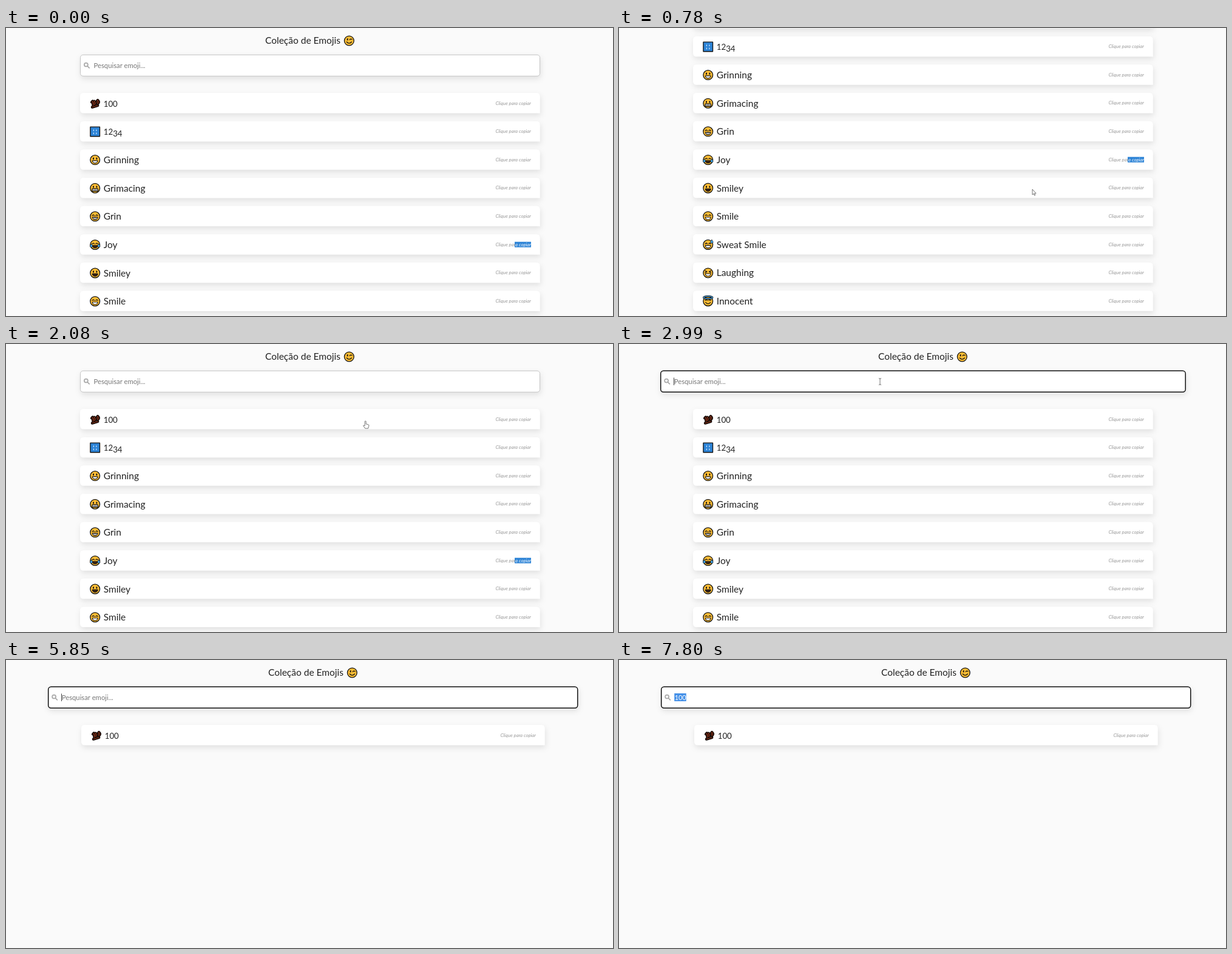
Animation of 1000x475 px, one loop 8000 ms. Source, as an HTML page:

```html
<!DOCTYPE html>
<html lang="pt">
<head>
<meta charset="utf-8">
<title>Coleção de Emojis</title>
<style>
html, body { margin: 0; width: 100%; height: 100%; overflow: hidden; background: #fafafa; }
svg { display: block; width: 100vw; height: 100vh; font: 15.5px Lato, "Open Sans", sans-serif; fill: #222; }
.card { fill: #fff; filter: drop-shadow(1px 4px 5px rgba(0,0,0,.1)); }
.hint { font-size: 7.8px; font-style: italic; fill: #999; text-anchor: end; }
.field { font-size: 11.3px; }
.icon { fill: none; stroke: #111; stroke-width: 1.3; stroke-linecap: round; stroke-linejoin: round; }
.pointer { fill: #fff; stroke: #555; stroke-width: .8; stroke-linejoin: round; }
</style>
</head>
<body>
<svg id="stage" viewBox="0 0 1000 475"></svg>
<script>
const LOOP = 8000, STEP = 130, PITCH = 46.63, ROW_H = 33.5;
const YELLOW = '#fbbc35', BLUE = '#2c83d6';

const path = (d, fill = 'none', extra = '') => `<path d="${d}" fill="${fill}" ${extra}/>`;
const disc = (r, fill, x = 0, y = 0, extra = '') => `<circle cx="${x}" cy="${y}" r="${r}" fill="${fill}" ${extra}/>`;
const face = (...parts) => disc(7.9, YELLOW) + parts.join('');

const dots = path('M-2.7-3v1.6M2.7-3v1.6', 'none', 'stroke-width="1.9"');
const arcs = path('M-4.6-1.3q1.7-2.6 3.4 0M1.2-1.3q1.7-2.6 3.4 0');
const grin = fill => path('M-4.4 1.3h8.8a4.4 4 0 0 1-8.8 0z', fill, 'stroke-width="1.1"');
const smile = path('M-4 2q4 4.4 8 0');
const teeth = path('M-2 1.4v3.4M0 1.4v3.8M2 1.4v3.4', 'none', 'stroke-width=".6"');
const drop = (x, y) => path(`M${x} ${y - 3}q-4.4 5.2 0 5.6q4.4-.4 0-5.6z`, '#41a8ee', 'stroke-width=".7"');
const hand = 'M-6.5 0l3-1 4-6q2.4.4 1.4 3.2l-.8 2.3h4.6q2 .5 1 2l-1.8 6.2q-.6 1-2 1h-9.4z';
const cloud = path('M-4 1.5q-2.5-1.2-.4-3q0-3.4 3.4-2.9q3.4-1 3.9 2q3.4 1 .8 3.9z', '#eee', 'stroke-width=".9"');
const clock = hands => disc(7.6, '#f4f4f4') + path(hands);

const numeral = 'M-5.5-2l1.6-1.6.8 7M-1-3.4q-2.4 3 .2 5.6q3-2.6-.2-5.6zM4.4-5.2q-2.6 3 .1 5.8q3.2-2.6-.1-5.8zM-4.6 6.2l9-2.6';
const icons = {
  '100': path(numeral, 'none', 'stroke="#160b07" stroke-width="4.6"') + path(numeral, 'none', 'stroke="#a03a1c" stroke-width="1"'),
  '1234': path('M-7.8-7.8h15.6v15.6h-15.6z', BLUE) +
    path('M-2.3-3v1.6M2.2-3v1.6M-2.3 2v1.6M2.2 2v1.6', 'none', 'stroke="#d8ecff" stroke-width="1.2"'),
  'Grinning': face(dots, grin('#fff')),
  'Grimacing': face(dots, path('M-4.6 1h9.2v3.8h-9.2z', '#fff'), teeth),
  'Grin': face(arcs, grin('#fff'), teeth),
  'Joy': face(arcs, grin('#3b2414'), drop(-6.2, 1.5), drop(6.2, 1.5)),
  'Smiley': face(dots, grin('#3b2414')),
  'Smile': face(arcs, grin('#fff')),
  'Sweat Smile': face(arcs, grin('#fff'), drop(6.2, -5)),
  'Laughing': face(path('M-4.8-3.6l3 1.7-3 1.5M4.8-3.6l-3 1.7 3 1.5'), grin('#fff')),
  'Innocent': face(arcs, smile, '<ellipse cy="-6.2" rx="7.2" ry="2" stroke="#111" stroke-width="3"/><ellipse cy="-6.2" rx="7.2" ry="2" stroke="#4da9ea"/>'),
  'Wink': face(path('M-2.7-3v1.6', 'none', 'stroke-width="1.9"'), path('M1-1.8q1.8-1.8 3.8-.4'), smile),
  'Blush': face(arcs, smile),
  'Slight Smile': face(dots, smile),
  'Hugging': face(arcs, smile, path('M-7.4 3.4q2.8-1.4 4 1.8l-1.2 2.4q-3.3 0-2.8-4.2zM7.4 3.4q-2.8-1.4-4 1.8l1.2 2.4q3.3 0 2.8-4.2z', YELLOW)),
  'Hushed': face(dots, path('M-4.8-5.4l2-.8M4.8-5.4l-2-.8'), disc(2, '#3b2414', 0, 3.4)),
  'Thinking': face(dots, path('M-2.5 2.2q2.8-1.5 5 0M-5 6.6l1-2.6 4 .8')),
  'Thumbsup': path(hand, YELLOW),
  'Thumbsdown': `<g transform="scale(1 -1)">${path(hand, YELLOW)}</g>`,
  'Camel': path('M-7-5.8l3-1 1.4 1.6-.6 3.8q1.3.5 1.7-1.8q1.7-4.4 3.6 0q3.8-.6 4.4 3v3l-1.4 1v4.4h-2v-4.4h-4.2v4.4h-2v-5q-3.2-1.4-2.6-6.6l-1.6-.4z', '#eaa23a'),
  'Sun With Face': disc(7.3, YELLOW, 0, 0, 'stroke-width="2.6" stroke-dasharray="2.5 2.2"') +
    disc(5.8, YELLOW, 0, 0, 'stroke-width=".8"') + path('M-2-1.6v.8M2-1.6v.8M-2.4 1.6q2.4 2.2 4.8 0', 'none', 'stroke-width="1"'),
  'Thunder Cloud Rain': cloud + path('M.8.2l-1.6 2.4h1.8l-1.2 2.2M-3 3l-.5 1.2M3.4 3l-.5 1.2', 'none', 'stroke-width=".8"'),
  'Clock10': clock('M0-4.6v4.6l-3.2-2'),
  'Clock1030': clock('M0 4.6v-4.6l-3.4-1.2'),
};
const narrow = { 'Thumbsup': -2.5, 'Thumbsdown': -2.5, 'Thunder Cloud Rain': -6 };

const ALL = ['100', '1234', 'Grinning', 'Grimacing', 'Grin', 'Joy', 'Smiley', 'Smile', 'Sweat Smile',
  'Laughing', 'Innocent', 'Wink', 'Blush', 'Slight Smile'];
const HU = ['100', 'Hugging', 'Hushed', 'Thumbsup', 'Thumbsdown', 'Camel', 'Sun With Face', 'Thunder Cloud Rain'];
const H = ['100', 'Laughing', 'Hugging', 'Thinking', 'Hushed', 'Thumbsup', 'Thumbsdown', 'Camel', 'Sun With Face'];

// [time, typed text, visible list, caret shown]
const script = [
  [0, '', ALL, 0], [2600, '', ALL, 1], [3120, '', ALL, 0],
  [3770, 'h', ALL, 1], [3900, 'h', H, 1], [4030, 'hu', H, 1], [4160, 'hun', HU, 1],
  [4290, 'hun', ['100', 'Sun With Face', 'Thunder Cloud Rain'], 1],
  [4420, 'hund', ['100', 'Sun With Face', 'Thunder Cloud Rain'], 1],
  [4550, 'hund', ['100', 'Thunder Cloud Rain'], 1],
  [4680, 'hundr', ['100'], 1], [4940, 'hundred', ['100'], 1], [5460, 'hundred', ['100'], 0],
  [5590, 'hundre', ['100'], 1], [5720, 'hun', ['100'], 1], [5850, '', ['100'], 1],
  [6110, '', ALL, 1], [6240, '1', ALL, 1], [6370, '1', ['100', '1234', 'Clock10', 'Clock1030'], 1],
  [6500, '10', ['100', '1234', 'Clock10', 'Clock1030'], 1], [6630, '10', ['100', 'Clock10', 'Clock1030'], 1],
  [6890, '100', ['100', 'Clock10', 'Clock1030'], 1], [7020, '100', ['100'], 1],
  [7540, '100', ['100'], 0], [7800, '100', ['100'], 0],
];

const scrollKeys = [[130, 0], [780, 140], [1040, 159], [1170, 159], [1300, 87], [1560, 0]];
const mouseX = [[1560, 682], [2080, 593], [2340, 430]];
const mouseY = [[1560, 271], [2080, 133], [2340, 62]];

function track(keys, t) {
  const i = keys.findIndex(k => k[0] > t);
  if (i < 0) return keys.at(-1)[1];
  if (i === 0) return keys[0][1];
  const [t0, a] = keys[i - 1], [t1, b] = keys[i];
  return a + (b - a) * (t - t0) / (t1 - t0);
}

const icon = (name, x, y) => `<g class="icon" transform="translate(${x} ${y})">${icons[name]}</g>`;

function label(name) {
  if (!/^\d+$/.test(name)) return name;
  return `<tspan font-size="13.3">${name.replace('34', '<tspan dy="3">34</tspan>')}</tspan>`;
}

function row(name, i, x, w, selected) {
  const y = 107 + i * PITCH, end = x + w - 14.7;
  const hint = selected
    ? `<rect x="${end - 27}" y="${y + 12.5}" width="27" height="9" fill="${BLUE}"/>
       <text class="hint" x="${end}" y="${y + 19.6}">Clique par<tspan fill="#fff">a copiar</tspan></text>`
    : `<text class="hint" x="${end}" y="${y + 19.6}">Clique para copiar</text>`;
  return `<path class="card" d="M${x + 6} ${y}h${w - 12}q6 0 6 6v${ROW_H - 6}h${6 - w}q-6 0-6-6v${12 - ROW_H}q0-6 6-6z"/>`
    + icon(name, x + 24.7 + (narrow[name] || 0) / 3, y + 17.3)
    + `<text x="${x + 38.7 + (narrow[name] || 0)}" y="${y + 22.8}">${label(name)}</text>` + hint;
}

function search(t, text, caret, wide) {
  const grow = 1 - (1 - Math.min(1, Math.max(0, (t - 2520) / 470))) ** 2;
  const focused = t >= 2600, selected = t >= 7800;
  const x = wide ? 69.7 : 122.5 - 53.8 * grow;
  const w = wide ? 872 : 757 + 107.5 * grow;
  const tx = x + 22;
  const size = /\d/.test(text) ? 10.9 : 11.3;
  const caretX = tx + (text ? measure(text, size) + .6 : -.2);
  return `<rect class="card" x="${x}" y="44.3" width="${w}" height="35" rx="4.5"
      stroke="${focused ? '#111' : '#c4c4c4'}" stroke-width="${focused ? 1.5 : 1}"/>
    <g fill="none" stroke="#a9a9a9" stroke-width="1.7"><circle cx="${x + 9.4}" cy="60.6" r="3"/><path d="M${x + 11.6} 62.8l3.6 3.6"/></g>`
    + (selected ? `<rect x="${tx - .5}" y="55" width="19.5" height="13" fill="#4490e8"/>` : '')
    + `<text class="field" x="${tx}" y="65.6" font-size="${size}" style="font-size:${size}px"
      fill="${selected ? '#fff' : text ? '#222' : '#777'}">${text || 'Pesquisar emoji...'}</text>`
    + (caret ? `<path d="M${caretX} 55.5v12.5" stroke="#111" stroke-width=".8"/>` : '');
}

const pen = document.createElement('canvas').getContext('2d');
function measure(text, size) {
  pen.font = `${size}px Lato, "Open Sans", sans-serif`;
  return pen.measureText(text).width;
}

function pointer(t) {
  if (t < 390 || t >= 3770) return '';
  const shape = t >= 2340 ? 'M-2-5.5q2 0 2 1.5v8q0 1.5-2 1.5M2-5.5q-2 0-2 1.5M2 5.5q-2 0-2-1.5'
    : t >= 2080 ? 'M-1.8-5.5q1.4-1.4 2 .3v4.2l4 1q1 .5.6 2.2l-1.2 4h-5l-3-4.4q0-1.6 2.6 0z'
    : 'M-1-5v9l2.1-1.8 1.3 3 1.4-.6-1.3-2.9h2.6z';
  return `<path class="pointer" d="${shape}" transform="translate(${track(mouseX, t)} ${track(mouseY, t)})"/>`;
}

const stage = document.getElementById('stage');
function draw(t) {
  const [, text, list, caret] = script.findLast(s => s[0] <= t);
  const wide = list.length < 8;   // a short list has no scrollbar
  const x = wide ? 124 : 122, w = wide ? 763.7 : 757.7, shift = wide ? 5 : 0;
  const rows = list.map((name, i) => row(name, i, x, w, name === 'Joy' && t < 2600)).join('');
  stage.innerHTML = `<g transform="translate(0 ${-track(scrollKeys, t)})">
    <text x="${427 + shift}" y="26.3">Coleção de Emojis</text>${icon('Wink', 565.3 + shift, 21)}
    ${search(t, text, caret, wide)}${rows}</g>${pointer(t)}`;
}

let shown = -1;
function tick() {
  const t = Math.floor(performance.now() % LOOP / STEP) * STEP;
  if (t !== shown) draw(shown = t);
  requestAnimationFrame(tick);
}
tick();
</script>
</body>
</html>
```
